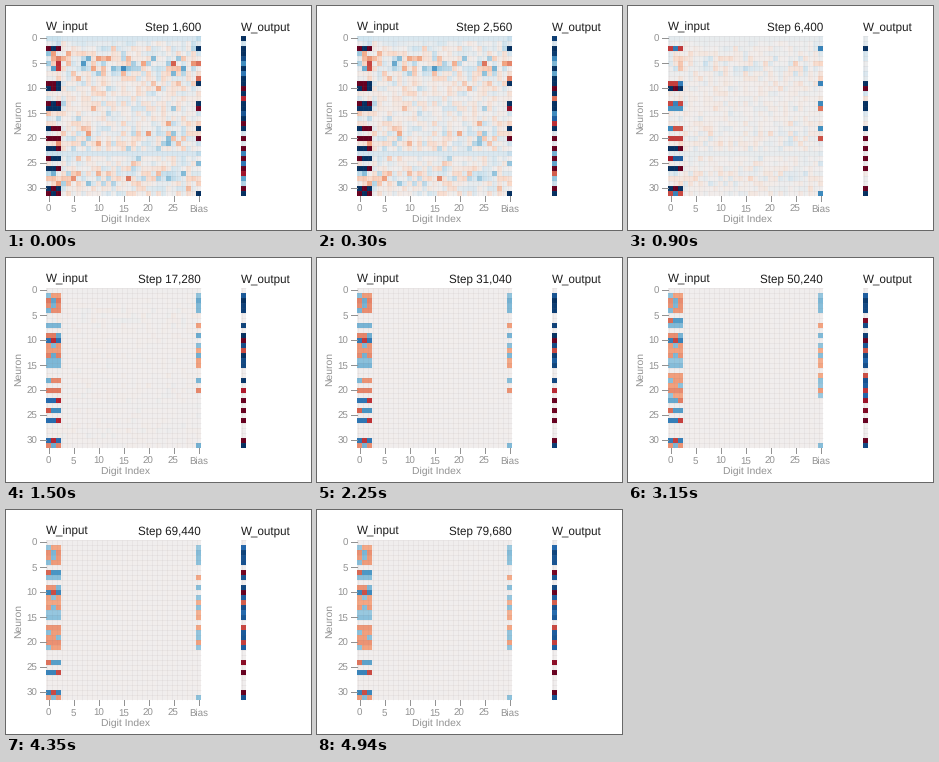
Animation of 305x224 px, one loop 6290 ms. Source, as a matplotlib script:

```python
import numpy as np
import matplotlib.pyplot as plt
from matplotlib.animation import FuncAnimation
from matplotlib.colors import LinearSegmentedColormap

W, H, DPI = 305, 224, 100
LOOP, INTERVAL = 6290, 17
STEP_MS, LAST_MS, LAST = 150, 4940, 33
ROWS, COLS, CELL = 32, 31, 5
LEFT, TOP, OUT_X = 40, 30, 235
RIGHT, BOTTOM = LEFT + COLS * CELL, TOP + ROWS * CELL
GRAY, INK = "#929292", "#1c1c1c"

plt.rcParams["font.family"] = "Liberation Sans"
plt.rcParams["text.hinting"] = "none"
cmap = LinearSegmentedColormap.from_list("weights", [
    "#67001f", "#b2182b", "#d6604d", "#f4a582", "#fad9c8", "#f1eeed",
    "#d1e5f0", "#92c5de", "#4393c3", "#2166ac", "#053061"])

# The network learns the parity of three digits: each neuron takes one
# sign pattern, and bias and output follow from it.
PATTERNS = {
    "+--": (1, 4, 18, 21), "-+-": (2, 3, 11, 13, 31), "--+": (9, 19),
    "+++": (7, 14, 15), "---": (12, 17, 20),
    "++-": (22, 26), "+-+": (10, 30), "-++": (6, 24),
}
WAVES = {5: (1, 3, 4, 7, 11, 12, 15), 16: (6, 17, 19, 21)}
WAKE = {r: step for step, rows in WAVES.items() for r in rows}
SLEEP = {22: 19}

rng = np.random.default_rng(16)
rows = np.arange(ROWS)


def bump(center, width):
    return np.exp(-((rows - center) / width) ** 2)


spread = .11 + .17 * bump(5.5, 2) + .1 * bump(20, 2) + .1 * bump(28, 1.5)
calm = bump(0, 1) + bump(23, .5)
noise = rng.normal(0, 1, (ROWS, COLS)) * (spread * (1 - calm))[:, None]
noise += .16 * calm[:, None]
noise[:, :3] *= 1.4
noise[:, -1] *= 1.6
out_noise = rng.normal(.3, 1, ROWS)
strength = rng.uniform(.88, 1.1, ROWS)


def fade(k, width):
    return np.exp(-(k / width) ** 2)


def ramp(k, start, length=6):
    u = np.clip((k - start) / length, 0, 1)
    return u * u * (3 - 2 * u)


def neuron(pattern):
    """Final input weights, bias and output for a sign pattern."""
    signs = np.array([1 if c == "+" else -1 for c in pattern])
    plus, parity = pattern.count("+"), signs.prod()
    if plus == 2:
        return .6 * signs, 0, -1
    bias = .4 if plus == 1 else -.38
    return .42 * signs, bias, .85 if parity > 0 else -.64


def weights(k):
    """Input and output weights at step k."""
    w = noise * fade(k, 6)
    out = out_noise * fade(k, 3.5)
    gain = 1 + 1.6 * fade(k, 5) + .2 * fade(k, 18)
    for pattern, members in PATTERNS.items():
        w_in, bias, w_out = neuron(pattern)
        for r in members:
            alive = ramp(k, WAKE.get(r, -9)) - ramp(k, SLEEP.get(r, 99))
            a = gain * strength[r] * alive
            w[r, :3] = w[r, :3] * (1 - alive) + w_in * a
            w[r, -1] = w[r, -1] * (1 - alive) + bias * a
            out[r] = out[r] * (1 - alive) + w_out * a
    return w, out[:, None]


def step_number(k):
    early = 5 * 4 ** (k / 6)
    late = np.interp(k, [6, 15, 21, 26, 33], [20, 97, 157, 193, 249])
    return 320 * int(round(early if k < 6 else late))


fig = plt.figure(figsize=(W / DPI, H / DPI), dpi=DPI, facecolor="white")
ax = fig.add_axes([0, 0, 1, 1])


def label(x, y, text, size, color=GRAY, **kw):
    return ax.text(x, y, text, fontsize=size * 72 / DPI, color=color, **kw)


def heatmap(x, cols):
    im = ax.imshow(np.zeros((ROWS, cols)), cmap=cmap, vmin=-1, vmax=1,
                   extent=(x, x + cols * CELL, BOTTOM, TOP),
                   interpolation="nearest", aspect="auto")
    style = dict(colors="#857878", lw=.72, alpha=.07)
    ax.hlines(TOP + .5 + CELL * rows, x, x + cols * CELL, **style)
    ax.vlines(x + .5 + CELL * np.arange(cols), TOP, BOTTOM, **style)
    return im


im_in = heatmap(LEFT, COLS)
im_out = heatmap(OUT_X, 1)

for n in range(0, 31, 5):
    x, y = LEFT + 2.5 + n * CELL, TOP + 2.5 + n * CELL
    ax.plot([33.5, 39.5], [y, y], color=GRAY, lw=.72)
    ax.plot([x, x], [BOTTOM + .5, BOTTOM + 5.5], color=GRAY, lw=.72)
    label(31, y - .3, str(n), 9.8, ha="right", va="center_baseline")
    label(x - .3, 205.5, "Bias" if n == 30 else str(n), 9.8, ha="center")

label(119.5, 216, "Digit Index", 10.4, ha="center")
label(12, 111, "Neuron", 10.4, rotation=90, ha="center", va="center")
label(LEFT, 25, "W_input", 11.6, INK)
label(OUT_X, 25, "W_output", 11.6, INK)
counter = label(RIGHT, 25, "", 11.6, INK, ha="right")

ax.set_xlim(0, W)
ax.set_ylim(H, 0)
ax.axis("off")


def update(i):
    t = (i + 1) * INTERVAL - 1
    k = LAST if t >= LAST_MS else t // STEP_MS
    w, out = weights(k)
    im_in.set_data(w)
    im_out.set_data(out)
    counter.set_text(f"Step {step_number(k):,}")
    return im_in, im_out, counter


anim = FuncAnimation(fig, update, frames=LOOP // INTERVAL, interval=INTERVAL,
                     repeat=True, repeat_delay=0, blit=False)
plt.show()
```
